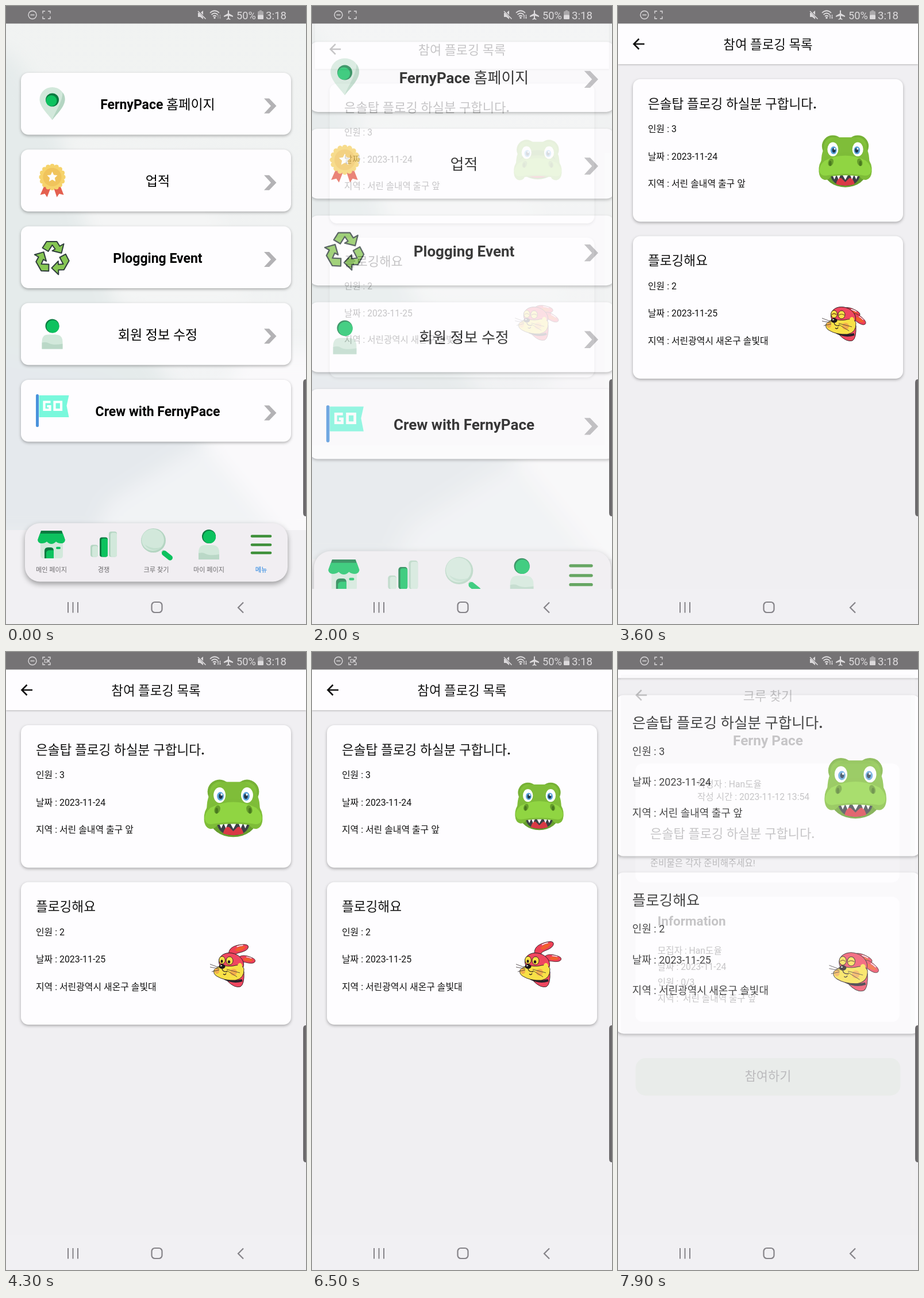
These frames come from a looping animation (522 by 1073 pixels, 8000 ms). An HTML page:

```html
<!DOCTYPE html>
<html lang="ko">
<head>
<meta charset="utf-8">
<title>Plogging app</title>
<style>
html, body { margin: 0; width: 100%; height: 100%; overflow: hidden; background: #f1f0f3; }
svg { display: block; width: 100vw; height: 100vh; }
text { font-family: Roboto, 'Noto Sans CJK KR', 'Noto Sans CJK', sans-serif; white-space: pre; }
.card { fill: #fefdff; filter: drop-shadow(0 2px 2.5px rgba(0,0,0,.3)); }
.bar { fill: #f1eef2; filter: drop-shadow(0 4px 5px rgba(0,0,0,.36)); }
.head { fill: #fefdff; filter: drop-shadow(0 1px 1.5px rgba(0,0,0,.25)); }
</style>
</head>
<body>
<svg id="stage" viewBox="0 0 522 1073" preserveAspectRatio="none"></svg>
<script>
const GREEN = '#0dc25f', DARK = '#0a7a40', PALE = '#d2e8db', SHADE = '#b4d5c2';

// drawing helpers; Hangul in bold lines is set in medium weight
const medium = s => s.replace(/[가-힣]+/g, '<tspan font-weight="500">$&</tspan>');
const text = (x, y, s, size, o = {}) =>
  `<text x="${x}" y="${y}" font-size="${size}" font-weight="${o.w || 400}" fill="${o.c || '#111'}" text-anchor="${o.a || 'start'}">${o.w ? medium(s) : s}</text>`;
const rect = (x, y, w, h, r, fill) => `<rect x="${x}" y="${y}" width="${w}" height="${h}" rx="${r}" fill="${fill}"/>`;
const card = (x, y, w, h, r = 13, cls = 'card') => `<rect class="${cls}" x="${x}" y="${y}" width="${w}" height="${h}" rx="${r}"/>`;
const oval = (x, y, rx, ry, fill, more = '') => `<ellipse cx="${x}" cy="${y}" rx="${rx}" ry="${ry}" fill="${fill}" ${more}/>`;
const path = (d, fill, more = '') => `<path d="${d}" fill="${fill}" ${more}/>`;
const line = (d, c, w, more = '') => path(d, 'none', `stroke="${c}" stroke-width="${w}" ${more}`);
const group = (s, attr = '') => `<g ${attr}>${s}</g>`;
const at = (x, y, s) => group(s, `transform="translate(${x} ${y})"`);
const ring = (n, f) => Array.from({ length: n }, (_, i) => f(i)).join('');

function star(r, inner, n) {
  return 'M' + Array.from({ length: n * 2 }, (_, i) => {
    const q = i % 2 ? inner : r, a = i * Math.PI / n - Math.PI / 2;
    return (q * Math.cos(a)).toFixed(1) + ' ' + (q * Math.sin(a)).toFixed(1);
  }).join('L') + 'Z';
}

// icons, each around its own centre
const person = oval(0, -15, 12, 12, DARK) + oval(1, -14, 11, 11, GREEN) +
  path('M-18 25V13Q-18 0 -7 0H5Q18 0 18 13V25Z', PALE) +
  path('M-18 25V14Q-10 12 -6 15Q2 19 18 16V25Z', SHADE, 'opacity=".8"');
const pin = path('M0 28C-8 17 -22 5 -22 -8A22 21 0 0 1 22 -8C22 5 8 17 0 28Z', PALE) +
  path('M0 28C8 17 22 5 22 -8Q22 -15 18 -20C18 -3 5 13 0 28Z', SHADE) +
  oval(0, -7, 11.5, 11.5, DARK) + oval(-1.5, -5.5, 9.5, 9.5, GREEN);
const medal = path('M-13 13L-21 31L-13 29L-9 35L-2 17Z', '#e4604f') +
  path('M13 13L20 31L12 29L8 35L2 17Z', '#e4604f') +
  ring(16, i => oval(19 * Math.cos(i * Math.PI / 8), 19 * Math.sin(i * Math.PI / 8), 4, 4, '#f6d36b')) +
  oval(0, 0, 20, 20, '#f6d36b') + oval(0, 0, 16, 16, '#f0c45c') + path(star(9.5, 4.6, 5), '#fffdf8');
const recycle = ring(3, i => path('M-17 -17L-10 -28H8L13 -20L20 -24L16 -8L0 -12L5 -15L0 -22L-7 -11Z', '#86c653',
  `stroke="#2f3d3c" stroke-width="2" stroke-linejoin="round" transform="rotate(${i * 120})"`));
const flag = path('M-23 -27H29L25 -9L29 11H-23Z', '#79f8dc') + rect(-28.5, -29, 5, 57, 2.5, '#4a92dc') +
  line('M-3 -15.5H-14V-2H-4V-8H-9M4 -15.5H15.5V-2H4Z', '#fff', 4.2);
const shop = path('M-19 -5H20V19Q20 24 15 24H-14Q-19 24 -19 19Z', PALE) +
  path('M-12 24V11Q-12 5 -6 5H-1Q4 5 4 11V24Z', DARK) + path('M-9 24V14Q-8 10 -3 10H4V24Z', GREEN) +
  rect(8, 4, 8, 4, 2, GREEN) +
  path('M-18 -24H18L23 -10H-23Z', DARK) + path('M-20 -19H20L24 -8Q23 -2 17 -2Q11 -2 8 -5Q4 -1 0 -1Q-4 -1 -8 -5Q-11 -2 -17 -2Q-23 -2 -24 -8Z', GREEN);
const bars = [[-23, 0, 13, 21, PALE, SHADE], [-7, -13, 14, 34, GREEN, DARK], [9, -23, 14, 44, PALE, SHADE]]
  .map(([x, y, w, h, a, b]) => rect(x, y, w, h, 4, b) + rect(x + 3, y + 2, w - 3, h - 2, 3.5, a)).join('');
const lens = line('M10 10L18 17', SHADE, 5) + line('M14 14L24 22', GREEN, 9, 'stroke-linecap="round"') +
  oval(-5, -8, 21.5, 21, SHADE) + oval(-6, -9, 19.5, 19, PALE) + path('M-20 -1A19 19 0 0 0 10 3Q-6 9 -20 -1Z', '#c2dfce');
const lines = [-15, 0, 14].map(y => line(`M-16 ${y}H16`, '#3d8f38', 4.6, 'stroke-linecap="round"')).join('');
const arrow = line('M46 66H28M36.5 57L27.5 66L36.5 75', '#111', 2.6);

const header = title => arrow + text(261, 75, title, 22.4, { a: 'middle' });

function menu() {
  const rows = [[pin, 'FernyPace 홈페이지', 170], [medal, '업적', 297], [recycle, 'Plogging Event', 437],
    [person, '회원 정보 수정', 570.5], [flag, 'Crew with FernyPace', 703]];
  const tabs = [[shop, '메인 페이지', 79, 935], [bars, '경쟁', 170, 935.5], [lens, '크루 찾기', 261.5, 936],
    [person, '마이 페이지', 353, 936], [lines, '메뉴', 444, 935.5]];
  const back = rect(-40, -60, 602, 970, 0, 'url(#sky)') + group(
    path('M-40 60L15 90Q70 160 100 245L140 390L195 515L350 757L200 920H-40Z', '#e5ebeb') +
    path('M100 240L330 260L420 520L300 520H190Z', '#f4f5f5') +
    path('M-40 600L170 640L345 757L190 925H-40Z', '#e5e9ed') +
    path('M415 600H570V930H470L345 757Z', '#faf9fb') +
    path('M180 860L345 757L480 925H150Z', '#f1f3f5'), 'filter="url(#soft)" clip-path="url(#photo)"');
  return rect(-40, -60, 602, 1200, 0, '#f1f0f3') + back +
    rows.map(([icon, s, y], i) => {
      const top = 116 + i * 133.25;
      return group(card(26, top, 470, 107.5) + at(80.5, y, icon) +
        text(264, top + 63, s, 23, { w: 700, c: '#000', a: 'middle' }) +
        path(`M449 ${top + 44.5}H458L470.5 ${top + 57.5}L458 ${top + 70.5}H449L461 ${top + 57.5}Z`, '#b3b2b5'),
        i == 4 ? 'id="crew"' : '');
    }).join('') +
    group(card(33, 898, 457, 101.5, 26, 'bar') + tabs.map(([icon, s, x, y], i) => at(x, y, icon) +
      text(x, 983, s, 11.2, { a: 'middle', c: i == 4 ? '#1b7fe0' : '#6f6d70' })).join(''));
}

function croc() {
  const both = f => f(-1) + f(1);
  const teeth = [-21, -13, 13, 21].map(x => path(`M${x - 4} 26H${x + 4}L${x} 35Z`, '#fff')).join('');
  return both(k => oval(24 * k, -29, 21, 21, '#76b135') + oval(24 * k, -28, 17, 18, '#83c23b')) +
    path('M-18 -46H18Q44 -34 46 -6L48 20H-48L-46 -6Q-44 -34 -18 -46Z', '#7fbd39') +
    group(oval(0, 19, 41, 31, '#679f2e') +
      path('M-29 23H29Q27 47 0 47Q-27 47 -29 23Z', '#3b4045') +
      path('M-18 44Q-14 29 -7 33L0 40L7 33Q14 29 18 44Q0 50 -18 44Z', '#d93a45') + teeth +
      path('M-5 27L0 36L5 27Z', '#fff'), 'id="jaw"') +
    path('M-43 -5Q-25 -17 0 -17Q25 -17 43 -5Q52 4 51 20Q50 34 40 36Q31 36 28 29Q0 25 -28 29Q-31 36 -40 36Q-50 34 -51 20Q-52 4 -43 -5Z', '#7ebc38') +
    path('M-40 -1Q-20 -11 0 -11Q20 -11 40 -1Q50 8 50 18Q48 30 34 27Q0 21 -34 27Q-48 30 -50 18Q-50 8 -40 -1Z', '#90d542') +
    both(k => oval(28 * k, 2, 5, 7.5, '#669d2c', `transform="rotate(${-20 * k} ${28 * k} 2)"`) +
      oval(29 * k, 4, 2.5, 5, '#49791f') +
      oval(24 * k, -23, 10.5, 13.5, '#fff') + oval(22.5 * k, -21, 6, 7.5, '#5aa4dc') +
      oval(22 * k, -21, 3.3, 4.5, '#20364c') + oval(22 * k + 1.5, -24, 1.7, 1.9, '#fff'));
}

function rabbit() {
  const ink = 'stroke="#2a1d22" stroke-width=".9"';
  const ear = id => group(path('M-4 3C-4 -9 5 -15 23 -13Q36 -12 35 -6Q33 1 15 1Q6 1 5 8Z', '#ee4058', ink) +
    path('M9 -6Q18 -12 30 -8Q27 -2 13 -2Z', '#f0602c') + line('M14 -11Q20 -12 26 -11', '#fff', 1.6), `id="${id}"`);
  return path('M-13 8L20 8Q21 30 14 34Q4 37 -8 25Z', '#ef4760', ink) +
    line('M-14 20Q2 28 17 23', '#25202a', 4) +
    ear('ear1') + ear('ear2') +
    oval(-2, -7, 22, 17, '#ef4760', ink + ' transform="rotate(18 -2 -7)"') +
    path('M-32 5Q-25 -2 -17 -3Q-4 0 6 -3Q17 -5 20 3Q21 20 5 23Q-14 24 -27 16Q-34 12 -32 5Z', '#f8e147', ink) +
    oval(13, -2, 4, 5, '#f8e147') + oval(-27, 7, 4, 5, '#f3ae4b') + oval(2, 9, 6, 6, '#f3ae4b') +
    oval(-18, -12, 5.4, 6.6, '#f8e147', ink) + oval(-5, -11, 6, 7, '#f8e147', ink) +
    group(oval(-18.5, -10, 2, 2.7, '#24181c') + oval(-6, -9, 2.2, 2.8, '#24181c'), 'id="pupils"') +
    group(line('M-22 -11Q-18 -15 -14 -11M-10 -10Q-5 -14 0 -10', '#7a4c20', 1.2), 'id="lids"') +
    oval(-18, -1, 5.5, 4, '#1d171b') + oval(-19.5, -2.3, 1.5, .9, '#fff') +
    line('M-18 3Q-17 9 -9 8M-16 12Q-13 15 -11 11', '#2a1d22', 1.3) +
    line('M-23 1L-39 -5M-23 3L-39 0M-23 5L-36 8M-10 4L13 10M-10 6L8 17', '#3a3033', .8);
}

function list() {
  const item = (y, title, n, date, place) => card(26, y, 470, 247.5) +
    text(52, y + 50.5, title, 22.6, { w: 700 }) +
    [`인원 : ${n}`, `날짜 : ${date}`, `지역 : ${place}`].map((s, i) => text(52, y + 92 + i * 47.5, s, 15.9)).join('');
  return rect(-40, -60, 602, 1200, 0, '#f0eff2') + card(0, -60, 522, 161, 0, 'head') + header('참여 플로깅 목록') +
    item(127, '은솔탑 플로깅 하실분 구합니다.', 3, '2023-11-24', '서린 솔내역 출구 앞') +
    item(399.5, '플로깅해요', 2, '2023-11-25', '서린광역시 새온구 솔빛대') +
    group(croc(), 'id="croc"') + group(rabbit(), 'id="rabbit" transform="translate(394 547)"');
}

function detail() {
  const info = ['모집자 : Han도율', '날짜 : 2023-11-24', '인원 : 0/3', '지역 :  서린 솔내역 출구 앞'];
  return rect(0, 30, 522, 982, 0, '#f0eff2') + header('크루 찾기') +
    text(261, 154.5, 'Ferny Pace', 24.9, { w: 700, a: 'middle' }) +
    rect(25.5, 187, 469, 210.5, 13, '#fefdff') + rect(25.5, 423, 469, 221.5, 13, '#fefdff') +
    text(135.5, 229, '작성자 : Han도율', 16) + text(135.5, 251.5, '작성 시간 : 2023-11-12 13:54', 16) +
    text(52, 319, '은솔탑 플로깅 하실분 구합니다.', 22.5, { w: 500 }) +
    text(52, 368.5, '준비물은 각자 준비해주세요!', 15.8) +
    text(65, 474, 'Information', 23, { w: 700 }) +
    info.map((s, i) => text(65, 523.5 + i * 28.5, s, 16)).join('') +
    rect(26, 708.5, 470, 66.5, 18, '#d3e6d3') + text(261, 748.5, '참여하기', 22.4, { a: 'middle' });
}

function system() {
  const c = '#dcdadc', g = '#858388';
  return rect(0, 0, 522, 30.5, 0, '#757375') + line('M39 15.5A7 7 0 1 1 53 15.5A7 7 0 1 1 39 15.5M42.5 15.5H49.5', c, 1.4) +
    line('M64 13V9H68M73 9H77V13M77 18V22H73M68 22H64V18', c, 1.3) +
    group(line('M67.3 13H72V18H67.3ZM73 15.5L75 13.5V17.5Z', c, 1.2), 'id="cam"') +
    path('M334 12H338L343 8V23L338 19H334Z', c) + line('M334 8L348 23', '#757375', 3) + line('M334 9L347.5 22.5', c, 1.6) +
    line('M355 12Q363 4.5 371 12M357.5 15Q363 10 368.5 15M360 18Q363 15.5 366 18', c, 1.7) + oval(363, 20.5, 1.7, 1.7, c) +
    group(line('M369 22V16M372.5 15V21', c, 1.2) + path('M367.5 17.5L369 15L370.5 17.5ZM371 20L372.5 22.5L374 20Z', c), 'id="data"') +
    path('M386 8Q387 6.5 388 8V13L395 17V19L388 17V21L390.5 23V24L387 23L383.5 24V23L386 21V17L379 19V17L386 13Z', c) +
    text(401, 22.5, '50%', 18.2, { c }) + rect(438, 9, 10, 14, 1.5, '#aaa8aa') + rect(441, 7.5, 4, 2, 0, '#aaa8aa') +
    rect(438, 15.5, 10, 7.5, 1.5, c) + text(452, 22.5, '3:18', 18.7, { c }) +
    rect(0, 1012, 522, 61, 0, '#f1f0f3') + line('M108 1035V1053.5M116.5 1035V1053.5M125 1035V1053.5', g, 2) +
    `<rect x="253.5" y="1035" width="18" height="18" rx="5.5" fill="none" stroke="${g}" stroke-width="2.2"/>` +
    line('M413 1035.5L404 1044.5L413 1053.5', g, 2.2) +
    path('M522 648Q517 648 517 654V880Q517 886 522 886Z', '#6c6a6c');
}

document.getElementById('stage').innerHTML = `<defs>
  <linearGradient id="sky" x2="0" y2="1"><stop stop-color="#f1f3f2"/><stop offset=".5" stop-color="#f0f2f2"/><stop offset="1" stop-color="#f5f6f8"/></linearGradient>
  <filter id="soft"><feGaussianBlur stdDeviation="16"/></filter>
  <clipPath id="photo"><rect x="-40" y="-60" width="602" height="970"/></clipPath></defs>` +
  group(menu(), 'id="menu"') + group(list(), 'id="list"') + group(detail(), 'id="detail"') + system();

const el = id => document.getElementById(id);
const set = (id, name, v) => el(id).setAttribute(name, v);

// piecewise linear value from [time, value] steps
function along(steps, t) {
  if (t <= steps[0][0]) return steps[0][1];
  for (let i = 1; i < steps.length; i++) {
    const [a, u] = steps[i - 1], [b, v] = steps[i];
    if (t <= b) return u + (v - u) * (t - a) / (b - a);
  }
  return steps[steps.length - 1][1];
}

const ZOOM = [[-100, 0], [0, .87], [100, .96], [200, 1]];
const FADE = [[-100, 0], [0, .23], [100, 1]];
const PRESS = [[900, 1], [1000, .8], [1100, .4], [1200, .24], [1350, .2], [1600, 1]];
const BITE = [[0, 85], [700, 96], [1200, 93], [1400, 96], [2000, 104], [2700, 103], [3050, 88], [3600, 86], [4100, 85]];

const zoom = (id, s) => set(id, 'transform', `translate(260 527) scale(${s}) translate(-260 -527)`);
const show = (id, on) => { el(id).style.display = on ? '' : 'none'; };

// opens one page over another: both grow, the new one fades in
function open(under, over, dt) {
  const p = dt < 0 ? 0 : along(ZOOM, dt), a = dt < 0 ? 0 : along(FADE, dt);
  show(over, a > 0);
  show(under, a < 1);
  zoom(under, 1 + .15 * p);
  if (a > 0) zoom(over, .85 + .15 * p);
  set(over, 'opacity', a);
}

function draw(t) {
  open('menu', 'list', t - 2000);
  if (t < 7900) show('detail', false);
  else open('list', 'detail', t - 7900);
  set('crew', 'opacity', along(PRESS, t));

  const blink = t % 1900;
  show('cam', blink >= 500 && blink < 1550);
  set('data', 'opacity', t < 2000 ? .45 : 1);

  const fresh = along([[2400, .7], [2600, 1]], t);
  const bite = along(BITE, (t + 1700) % 4100) / 103;
  set('croc', 'transform', `translate(395.5 ${269.5 + (bite - .9) * 20}) scale(${bite})`);
  set('croc', 'opacity', fresh);
  set('jaw', 'transform', `translate(0 ${along([[2400, -16], [2700, 0]], t)})`);
  set('rabbit', 'opacity', fresh);

  const d = Math.abs((t - 2200 + 1075 + 2150) % 2150 - 1075);
  const lift = Math.max(0, 1 - d / 270);
  set('ear1', 'transform', `translate(-3 ${-16 - 8 * lift}) rotate(${22 - 42 * lift}) scale(${.85 + .1 * lift})`);
  set('ear2', 'transform', `translate(11 ${-8 - 5 * lift}) rotate(${38 - 28 * lift}) scale(.8)`);
  show('pupils', lift > .5);
  show('lids', lift <= .5);
}

const start = performance.now();
function tick() {
  const t = (performance.now() - start) % 8000;
  draw(Math.floor(t / 100) * 100);
  requestAnimationFrame(tick);
}
tick();
</script>
</body>
</html>
```
